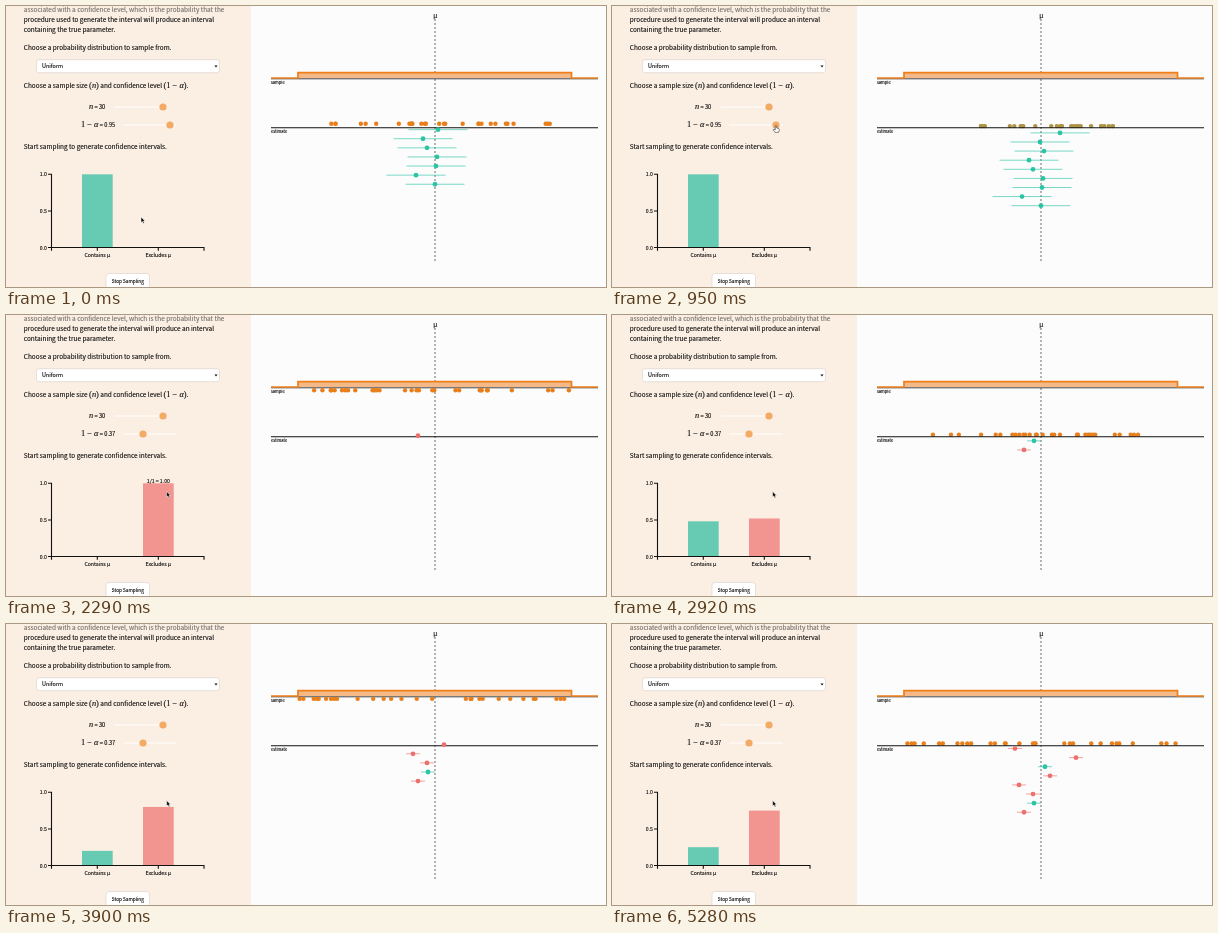
Recreate the animation shown at these times as an HTML page. Size 600 px wide and 281 px high, loop 5.3 s.

```html
<!DOCTYPE html>
<html lang="en">
<head>
<meta charset="utf-8">
<title>Confidence intervals</title>
<style>
html, body { margin: 0; width: 100%; height: 100%; overflow: hidden; background: #fdfcfd; }
svg { display: block; width: 600px; height: 281px; }
text { font: 6.46px "Noto Sans CJK SC", "Noto Sans CJK JP", "Noto Sans CJK", Lato, sans-serif; fill: #111; stroke: #111; stroke-width: .13px; white-space: pre; }
.math { font: 8.4px "Liberation Serif", serif; }
.it { font-style: italic; }
.faded { fill: #77716c; stroke: #77716c; }
.value { font-size: 5.7px; }
.axis { font-size: 5.2px; }
.tiny { font-size: 4px; }
.mid { text-anchor: middle; }
.end { text-anchor: end; }
</style>
</head>
<body>
<svg viewBox="0 0 600 281">
  <rect width="245" height="281" fill="#fbeee2"/>
  <text class="faded" x="17.8" y="6">associated with a confidence level, which is the probability that the</text>
  <text x="17.8" y="16">procedure used to generate the interval will produce an interval</text>
  <text x="17.8" y="26">containing the true parameter.</text>
  <text x="17.8" y="43.7">Choose a probability distribution to sample from.</text>
  <rect x="30.5" y="53.7" width="183" height="13" rx="2.5" fill="#fff" stroke="#ddd6d0" stroke-width=".7"/>
  <text x="36" y="62.4" style="font-size:5.5px">Uniform</text>
  <path d="M208.4 59.4h3.2l-1.6 2.2z" fill="#111"/>
  <text x="17.8" y="82">Choose a sample size <tspan class="math">(<tspan class="it">n</tspan>)</tspan> and confidence level <tspan class="math">(1 − <tspan class="it">α</tspan>)</tspan>.</text>
  <text x="83" y="103"><tspan class="math it">n</tspan><tspan class="value"> = 30</tspan></text>
  <path d="M109 101H160M118 119H170" stroke="#fffaf6" stroke-width="1.6" stroke-linecap="round"/>
  <circle cx="157" cy="101" r="3.6" fill="#f2aa64"/>
  <text x="17.8" y="143">Start sampling to generate confidence intervals.</text>
  <rect x="100" y="267.5" width="43.5" height="16" rx="3" fill="#fff" stroke="#ddd6d0" stroke-width=".7"/>
  <text class="mid" x="121.8" y="276.7" style="font-size:4.7px">Stop Sampling</text>
  <text class="axis end" x="41" y="170.4">1.0</text>
  <text class="axis end" x="41" y="207.2">0.5</text>
  <text class="axis end" x="41" y="243.7">0.0</text>
  <text class="axis mid" x="91.3" y="250.7">Contains μ</text>
  <text class="axis mid" x="152.3" y="250.7">Excludes μ</text>
  <text class="mid" x="429.3" y="11.8" style="font-size:6.5px">μ</text>
  <text class="tiny" x="265" y="77.6">sample</text>
  <text class="tiny" x="265" y="127">estimate</text>
  <path d="M429 13V255" stroke="#444" stroke-width=".8" stroke-dasharray="2 2"/>
  <path d="M265 72.8H592" stroke="#111" stroke-width=".8"/>
  <path d="M292 72V66.6H565.5V72Z" fill="#f5b987"/>
  <path d="M265 72H292V66.6H565.5V72H592" fill="none" stroke="#ee7f1b" stroke-width="1.7"/>
  <g id="stage"></g>
</svg>
<script>
const LOOP = 5300, PERIOD = 403, RESET = 1060, MU = 429;
const ORANGE = [232, 127, 27], TEAL = [43, 196, 164], RED = [238, 112, 108];
const stage = document.getElementById('stage');

const clamp = u => Math.max(0, Math.min(1, u));
const mix = (a, b, u) => a + (b - a) * u;
const quad = u => (u = clamp(u)) < .5 ? 2 * u * u : 1 - 2 * (1 - u) ** 2;
const cubic = u => (u = clamp(u)) < .5 ? 4 * u ** 3 : 1 - 4 * (1 - u) ** 3;
const rgb = (a, b, u) => `rgb(${a.map((v, i) => Math.round(mix(v, b[i], u)))})`;
const circle = (x, y, r, fill) => `<circle cx="${x}" cy="${y}" r="${r}" fill="${fill}"/>`;
const path = (d, attrs) => `<path d="${d}" fill="none" ${attrs}/>`;

let seed = 20177;
function random() {
  seed = (seed * 16807) % 2147483647;
  return seed / 2147483647;
}

// One run of the sampler: a new mean is born every period
function makeRun(start, half, means) {
  return means.map((x, i) => ({
    x, half,
    born: start + i * PERIOD,
    hit: Math.abs(x - MU) <= half + .5,
    xs: Array.from({ length: 30 }, () => mix(293, 565, random()))
  }));
}
const wide = makeRun(-2534, 29.5, [429, 410, 430, 431, 421, 417, 432, 428, 448, 438]);
const narrow = makeRun(2303, 7, [412, 422, 421, 407, 438, 433, 464, 403, 425]);

// Draws fall from the distribution, then gather at their mean
function sampleDots({ x, xs, hit, born }, t) {
  const p = t - born;
  if (p < -450 || p >= -15) return '';
  const pull = cubic((p + 265) / 250);
  const y = 72 + 47.5 * quad((p + 450) / 190) + 1.3 * pull;
  const fill = rgb(ORANGE, hit ? TEAL : RED, pull ** 1.6);
  return xs.map(v => circle(mix(v, x, pull), y, 2.2, fill)).join('');
}

function interval({ x, hit, born, half }, t) {
  const p = t - born;
  if (p < -15) return '';
  const y = 121 + .02258 * p, w = half * clamp((p + 25) / 60);
  const fill = `rgb(${hit ? TEAL : RED})`;
  return path(`M${x - w} ${y}h${2 * w}`, `stroke="${fill}" stroke-width=".8" opacity=".8"`) + circle(x, y, 2.4, fill);
}

// Shares of intervals that contain and exclude the mean
function shares(t) {
  if (t < narrow[0].born - 265) return [1 - cubic((t - RESET) / 250), 0];
  let now = [0, 0], hits = 0;
  narrow.forEach(({ hit, born }, i) => {
    hits += hit;
    const f = hits / (i + 1), u = cubic((t - born + 265) / 250);
    now = [mix(now[0], f, u), mix(now[1], 1 - f, u)];
  });
  return now;
}

function chart(t) {
  const [inside, outside] = shares(t);
  const bar = (x, v, fill) => `<rect x="${x}" y="${241.5 - 73.2 * v}" width="30.7" height="${73.2 * v}" fill="${fill}"/>`;
  const label = t > 2180 && outside > .86
    ? `<text class="axis mid" x="152.4" y="${241.3 - 73.2 * outside}">1/1 = 1.00</text>` : '';
  return bar(76, inside, '#67cbb4') + bar(137, outside, '#f29490') + label +
    path('M42 168.3H45.5V241.5H42M42 205H45.5M45.5 244.8V241.5H198V244.8M91.3 241.5V244.8M152.3 241.5V244.8',
      'stroke="#111" stroke-width="1.1"');
}

function slider(level) {
  return `<text x="75" y="121"><tspan class="math">1 − <tspan class="it">α</tspan></tspan>` +
    `<tspan class="value"> = ${level.toFixed(2)}</tspan></text>` + circle(119.8 + 46.5 * level, 119, 3.6, '#f2aa64');
}

function cursor(t, thumb) {
  const go = quad((t - 100) / 700), leave = quad((t - 1900) / 250);
  const x = t < 1900 ? mix(135, thumb, go) : mix(thumb, 160.6, leave);
  const y = t < 1900 ? mix(211, 119.8, go) : mix(119.8, 176.5, leave);
  const hand = t > 780 && t < 1930;
  const shape = hand
    ? 'M-.7 0Q0-.8.7 0V2.2L2.8 2.8Q3.6 3.2 3.3 4.5L2.6 6.6H-.9L-2.8 4Q-2.6 3-1.6 3.6L-.7 4.2Z'
    : 'M0 0V5.6L1.3 4.5 2.3 6.6 3.3 6.1 2.4 4.1H4.1Z';
  return `<path transform="translate(${x} ${y})" d="${shape}" fill="${hand ? '#fff' : '#111'}" ` +
    `stroke="${hand ? '#111' : '#fff'}" stroke-width=".5"/>`;
}

function render(t) {
  const run = t < RESET ? wide : narrow;
  const level = mix(.95, .37, quad((t - 1000) / 850));
  stage.innerHTML =
    run.map(s => sampleDots(s, t)).join('') +
    path('M265 121.8H592', 'stroke="#111" stroke-width="1.1"') +
    run.map(s => interval(s, t)).join('') +
    chart(t) + slider(level) + cursor(t, 119.8 + 46.5 * level);
}

const begin = performance.now();
function tick() {
  render((performance.now() - begin) % LOOP);
  requestAnimationFrame(tick);
}
tick();
</script>
</body>
</html>
```
